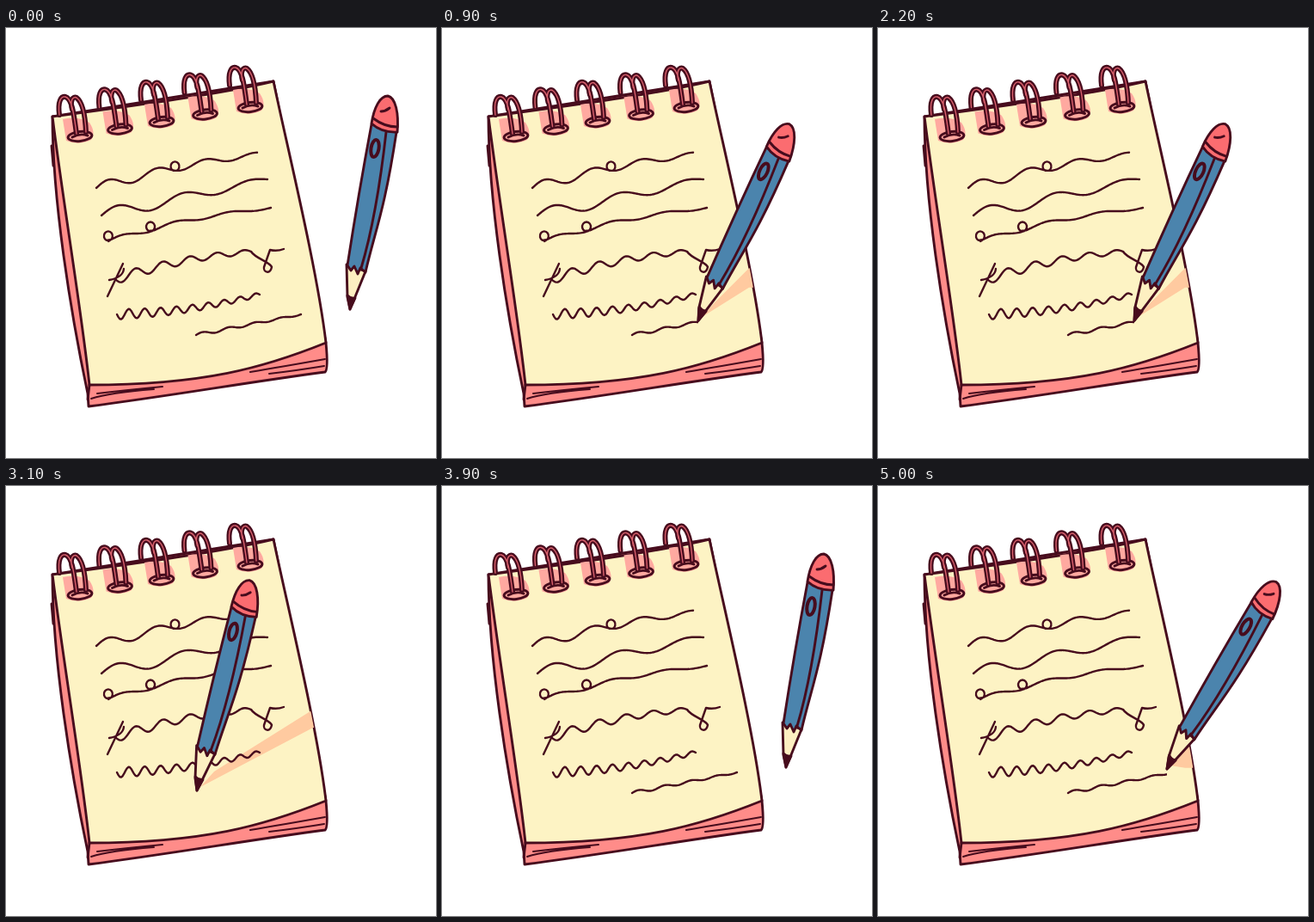
Write an HTML page that moves like this. It is 500 by 500 pixels and loops after 5030 ms.

```html
<!DOCTYPE html>
<html lang="en">
<head>
<meta charset="utf-8">
<title>Notepad and pencil</title>
<style>
html, body { margin: 0; width: 100%; height: 100%; overflow: hidden; background: #fff; }
svg {
  display: block; width: 100vw; height: 100vh;
  fill: none; stroke: #470c1d; stroke-width: 2.9; stroke-linecap: round; stroke-linejoin: round;
}
.cover { fill: #ff8c89; }
.page { fill: #fdf3c4; }
.thin { stroke-width: 2; }
.ink { stroke-width: 2.4; }
.wire { stroke-width: 6; }
.glint { stroke: #d9606c; stroke-width: 1.4; }
.blush { fill: #ffa9a0; stroke: none; }
.red { fill: #fb6c70; }
.blue { fill: #4b84ad; }
.wood { fill: #fdefc1; }
.lead { fill: #470c1d; }
#shadow { fill: #ffcaa0; stroke: none; }
</style>
</head>
<body>
<svg viewBox="0 0 500 500">
  <defs>
    <path id="sheet" d="M54 103C120 94 240 79 311 62C325 130 362 280 372 366C300 395 230 415 97 415C88 330 66 200 54 103Z"/>
    <clipPath id="onSheet"><use href="#sheet"/></clipPath>
    <clipPath id="written"><rect id="done" x="210" y="320" width="0" height="50"/></clipPath>
    <g id="ring">
      <path class="blush" d="M66 106Q84 102 97 110Q105 122 99 130Q84 137 70 131Z"/>
      <ellipse cx="86" cy="126" rx="14" ry="5.5" transform="rotate(-6 86 126)"/>
      <path d="M77 127Q86 122 95 125"/>
      <g id="wire">
        <path d="M62 101C60 85 64 79 69 80C77 82 79 101 82 123M77 95C74 84 78 79 82 81C89 86 92 100 93 121"/>
      </g>
    </g>
  </defs>

  <path class="cover" d="M54 103C54 200 75 330 95 425L96 440C190 428 280 412 371 400Q375 397 372 366L311 62Z"/>
  <use href="#sheet" class="page"/>
  <path d="M97 415L95 432M53 137L55 160"/>
  <path class="thin" d="M99 431Q120 424 172 420M106 425Q140 421 182 417M284 400Q320 394 371 385M306 402Q340 398 370 393"/>
  <g id="rings"></g>
  <path id="shadow" clip-path="url(#onSheet)"/>
  <g class="ink">
    <path id="text"/>
    <path d="M136 274L118 312M120 293Q136 290 137 280"/>
    <path d="M285 260C290 268 307 272 309 278C307 287 299 284 300 278L307 258Q315 260 323 257"/>
    <path id="last" clip-path="url(#written)"/>
  </g>

  <g id="pencil">
    <path class="wood" d="M396 275L397 313L400 327L405 315L418 283Z"/>
    <path class="lead" d="M397 311Q401 315 406 314L400 327Z"/>
    <path class="blue" d="M425 112Q410 192 397 276L401 282L405 277L409 286L412 279L418 284C429 236 440 214 454 121Z"/>
    <path d="M442 121Q431 219 413 279"/>
    <path class="red" d="M425 111C428 92 435 79 444 79C453 81 457 99 455 121Q437 122 425 111Z"/>
    <path d="M427 105Q440 115 455 115M436 97Q441 97 446 93"/>
    <ellipse cx="429" cy="140" rx="4.5" ry="10" transform="rotate(10 429 140)" stroke-width="4"/>
  </g>
</svg>
<script>
const $ = id => document.getElementById(id);
const set = (id, name, value) => $(id).setAttribute(name, value);

// A wavy line of handwriting with a bulge and small loops
function scribble(x0, y0, x1, y1, amp, waves, bulge, ...loops) {
  let d = '';
  for (let i = 0; i <= 100; i++) {
    const t = i / 100;
    const wave = amp * (1 - 0.6 * t) * Math.sin(2 * Math.PI * waves * t);
    const y = y0 + (y1 - y0) * t - wave - bulge * Math.sin(Math.PI * t);
    d += `${i ? 'L' : 'M'}${x0 + (x1 - x0) * t} ${y}`;
    if (loops.includes(i)) d += 'a5 5.5 0 1 0 -4 0';
  }
  return d;
}

set('text', 'd',
  scribble(105, 186, 292, 147, 6, 3.3, 4, 50) +
  scribble(111, 218, 304, 176, 8, 2.5, 0) +
  scribble(119, 248, 308, 209, 3, 3, 5, 1, 27) +
  scribble(127, 292, 285, 260, -6, 5, 5) +
  scribble(129, 333, 295, 310, -6, 9, -5));
set('last', 'd', scribble(221, 357, 343, 333, 2, 4, 0));

const wire = $('wire').innerHTML;
$('wire').innerHTML = `<g class="wire">${wire}</g><g class="glint">${wire}</g>`;
for (let i = 0; i < 5; i++) {
  $('rings').innerHTML += `<use href="#ring" x="${i * (45.5 + i)}" y="${-8.5 * i}"/>`;
}

// Tip position and turn of the pencil
function pose(step) {
  if (step < 0) return [400, 327, 0];
  if (step > 6) return [368, 326, 10];
  return [222 + 19 * step, 354 - 2 * step - 0.36 * step * step, 4 + 2.7 * step];
}

function draw() {
  const t = performance.now() % 5030 % 1300;
  const step = Math.floor((t - 500) / 100);
  const [x, y, turn] = pose(step);
  const writing = step >= 0 && step < 7;
  const top = 260 + 1.2 * step * step;
  const low = 281 + 1.3 * step * step;
  set('pencil', 'transform', `translate(${x - 400} ${y - 327}) rotate(${turn} 400 327)`);
  set('shadow', 'd', writing ? `M${x + 4} ${y - 4}l16 -18L357 ${top}H375V${low}H357Z` : '');
  set('done', 'width', !writing ? 150 : step ? x - 210 : 0);
  requestAnimationFrame(draw);
}
draw();
</script>
</body>
</html>
```
